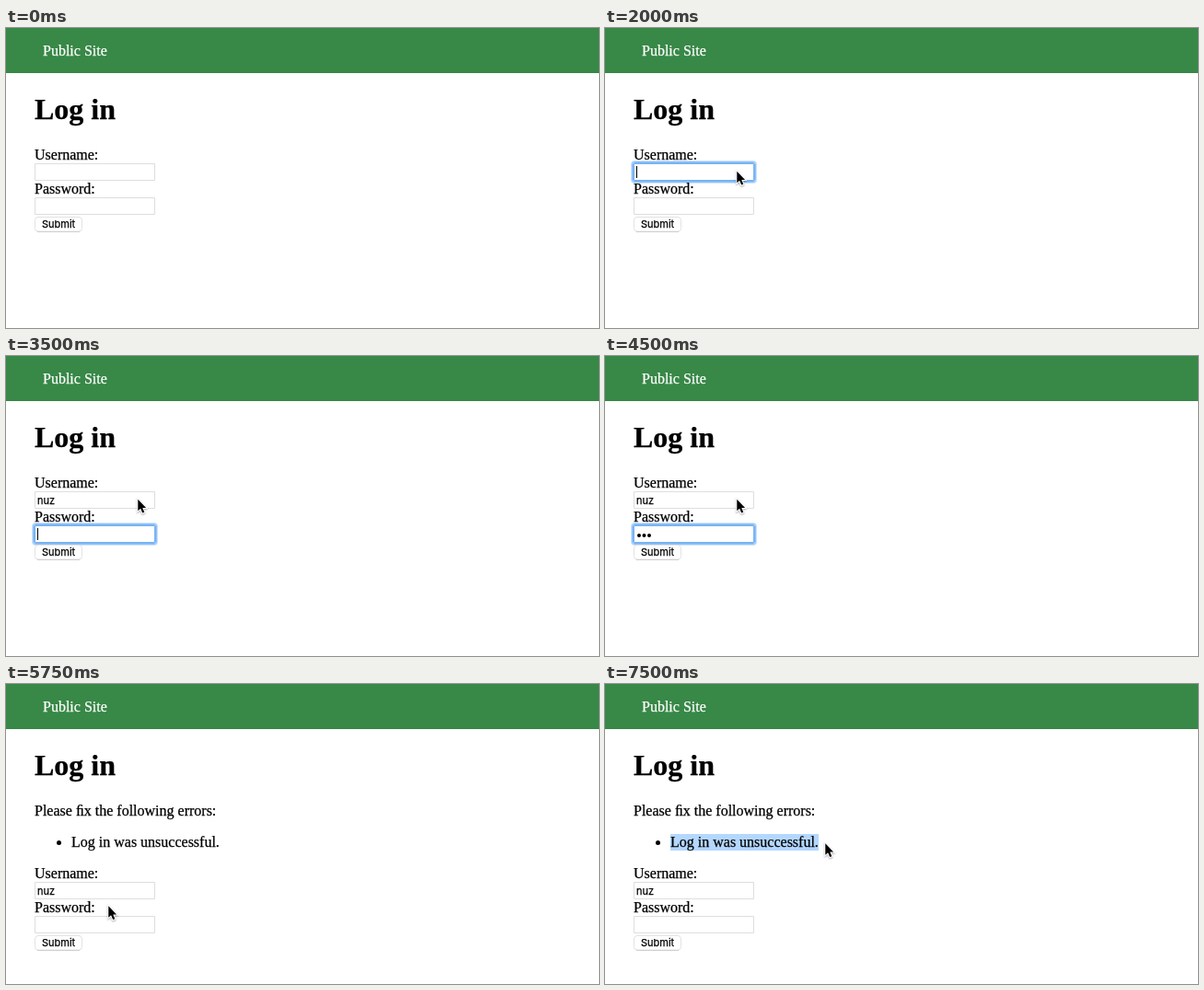
An HTML page with a canvas for the animation above (8 s loop, 644x326 px).

```html
<!DOCTYPE html>
<html lang="en">
<head>
<meta charset="utf-8">
<title>Log in</title>
<style>
  html, body { margin: 0; width: 100%; height: 100%; overflow: hidden; background: #fff; }
  canvas { display: block; }
</style>
</head>
<body>
<canvas id="stage" width="644" height="326"></canvas>
<script>
const ctx = document.getElementById('stage').getContext('2d');
const LOOP = 8000;
const TICK = 250;
const ENTER = 250, FOCUS_USER = 1000, TYPE_USER = 2250, FOCUS_PASS = 3500;
const FAIL = 4750, WANDER = 5250, DRAG = 6750;
const SERIF = '"Liberation Serif", serif';
const BODY = '16px ' + SERIF;
const UI = '11px Inter, sans-serif';
const USER = 'nuz';
const MESSAGE = 'Log in was unsuccessful.';
const MESSAGE_X = 71;
const FIELD = [143, 155.5];
const WANDER_PATH = [[-1, 235], [20, 272], [111, 241], [151, 199], [90, 173], [69, 172]];

const clamp = (v, low, high) => Math.min(high, Math.max(low, v));
const blink = idle => Math.floor(idle / 500) % 2 === 0;
const typed = (t, start, rate) => clamp(Math.floor((t - start) / TICK * rate), 0, USER.length);

function glide(t, start, duration, from, to, power) {
  const eased = 1 - (1 - clamp((t - start) / duration, 0, 1)) ** power;
  return from.map((v, i) => v + (to[i] - v) * eased);
}

function pointerAt(t) {
  if (t < ENTER) return null;
  if (t < WANDER) return glide(t, ENTER, 500, [401, 73], FIELD, 2.8);
  const last = WANDER_PATH.length - 1;
  if (t < DRAG) return WANDER_PATH[Math.min(last, (t - WANDER) / TICK)];
  return glide(t, DRAG, 750, WANDER_PATH[last], [239, 173], 2);
}

function text(str, x, y, font = BODY, color = '#000') {
  ctx.font = font;
  ctx.fillStyle = ctx.strokeStyle = color;
  ctx.lineWidth = 0.25;
  ctx.fillText(str, x, y);
  ctx.strokeText(str, x, y);
}

function disc(x, y, r) {
  ctx.fillStyle = '#000';
  ctx.beginPath();
  ctx.arc(x, y, r, 0, 2 * Math.PI);
  ctx.fill();
}

function outline(x, y, w, h, r, color) {
  ctx.lineWidth = 1;
  ctx.strokeStyle = color;
  ctx.beginPath();
  ctx.roundRect(x, y, w, h, r);
  ctx.stroke();
}

function input(y, focused) {
  ctx.fillStyle = '#fff';
  ctx.fillRect(31, y, 131, 19);
  outline(31.5, y + 0.5, 130, 18, 0, '#dedede');
  if (!focused) return;
  for (let d = -0.5; d < 3; d++) {
    const alpha = 0.85 - 0.1 * (d - 0.2) ** 2;
    outline(31 - d, y - d, 131 + 2 * d, 19 + 2 * d, d + 0.5, `rgba(96, 168, 246, ${alpha})`);
  }
}

function caret(x, y) {
  ctx.fillStyle = '#000';
  ctx.fillRect(Math.round(x), y + 3, 1, 13);
}

function button(y) {
  outline(31.5, y + 0.5, 51, 15.5, 3.5, '#e2e2e2');
  ctx.fillStyle = '#d0d0d0';
  ctx.fillRect(34, y + 16, 46, 1);
  text('Submit', 39, y + 12, UI);
}

function form(top, t) {
  const failed = t >= FAIL;
  const onUser = t >= FOCUS_USER && t < FOCUS_PASS;
  const onPass = t >= FOCUS_PASS && !failed;
  const user = USER.slice(0, typed(t, TYPE_USER, 1));
  const dots = failed ? 0 : typed(t, FOCUS_PASS, 1.5);

  text('Username:', 31, top + 12);
  input(top + 16, onUser);
  text(user, 34, top + 30, UI);
  if (onUser && (user || blink(t - FOCUS_USER))) {
    caret(34 + ctx.measureText(user).width, top + 16);
  }

  text('Password:', 31, top + 49);
  input(top + 53, onPass);
  for (let i = 0; i < dots; i++) disc(37 + 5.5 * i, top + 64, 2);
  if (onPass && blink(t - FOCUS_PASS - (dots && 500))) caret(34 + 5.7 * dots, top + 53);

  button(top + 74);
}

// Selects every letter the pointer has fully passed.
function selectedWidth(pointer) {
  const reach = pointer[0] - MESSAGE_X - 4;
  let width = 0;
  for (let n = 1; n <= MESSAGE.length; n++) {
    const next = ctx.measureText(MESSAGE.slice(0, n)).width;
    if (next > reach) break;
    width = next;
  }
  return Math.round(width);
}

function errors(t, pointer) {
  text('Please \uFB01x the following errors:', 31, 143);
  if (t > DRAG) {
    ctx.fillStyle = '#b3d7ff';
    ctx.fillRect(MESSAGE_X, 163, selectedWidth(pointer), 18);
  }
  disc(57.5, 172.5, 2.5);
  text(MESSAGE, MESSAGE_X, 177);
}

function drawPointer([x, y]) {
  const arrow = new Path2D('M0 0V12.5L2.8 10L4.9 14.8L7 13.9L5 9.2H8.8Z');
  ctx.save();
  ctx.translate(x + 0.3, y + 0.3);
  ctx.shadowColor = 'rgba(0, 0, 0, 0.35)';
  ctx.shadowBlur = 2;
  ctx.shadowOffsetY = 1;
  ctx.strokeStyle = '#fff';
  ctx.lineWidth = 2;
  ctx.stroke(arrow);
  ctx.shadowColor = 'transparent';
  ctx.fillStyle = '#000';
  ctx.fill(arrow);
  ctx.restore();
}

function draw(t) {
  const pointer = pointerAt(t);
  const failed = t >= FAIL;
  ctx.fillStyle = '#fff';
  ctx.fillRect(0, 0, 644, 326);
  ctx.fillStyle = '#388847';
  ctx.fillRect(0, 0, 644, 49);
  text('Public Site', 40, 30, BODY, '#fff');
  text('Log in', 31, 99, 'bold 32px ' + SERIF);
  if (failed) errors(t, pointer);
  form(failed ? 199 : 131, t);
  if (pointer) drawPointer(pointer);
}

ctx.fontKerning = 'none';
const start = performance.now();
function tick() {
  const t = (performance.now() - start) % LOOP;
  draw(Math.floor(t / TICK) * TICK);
  requestAnimationFrame(tick);
}
tick();
</script>
</body>
</html>
```
